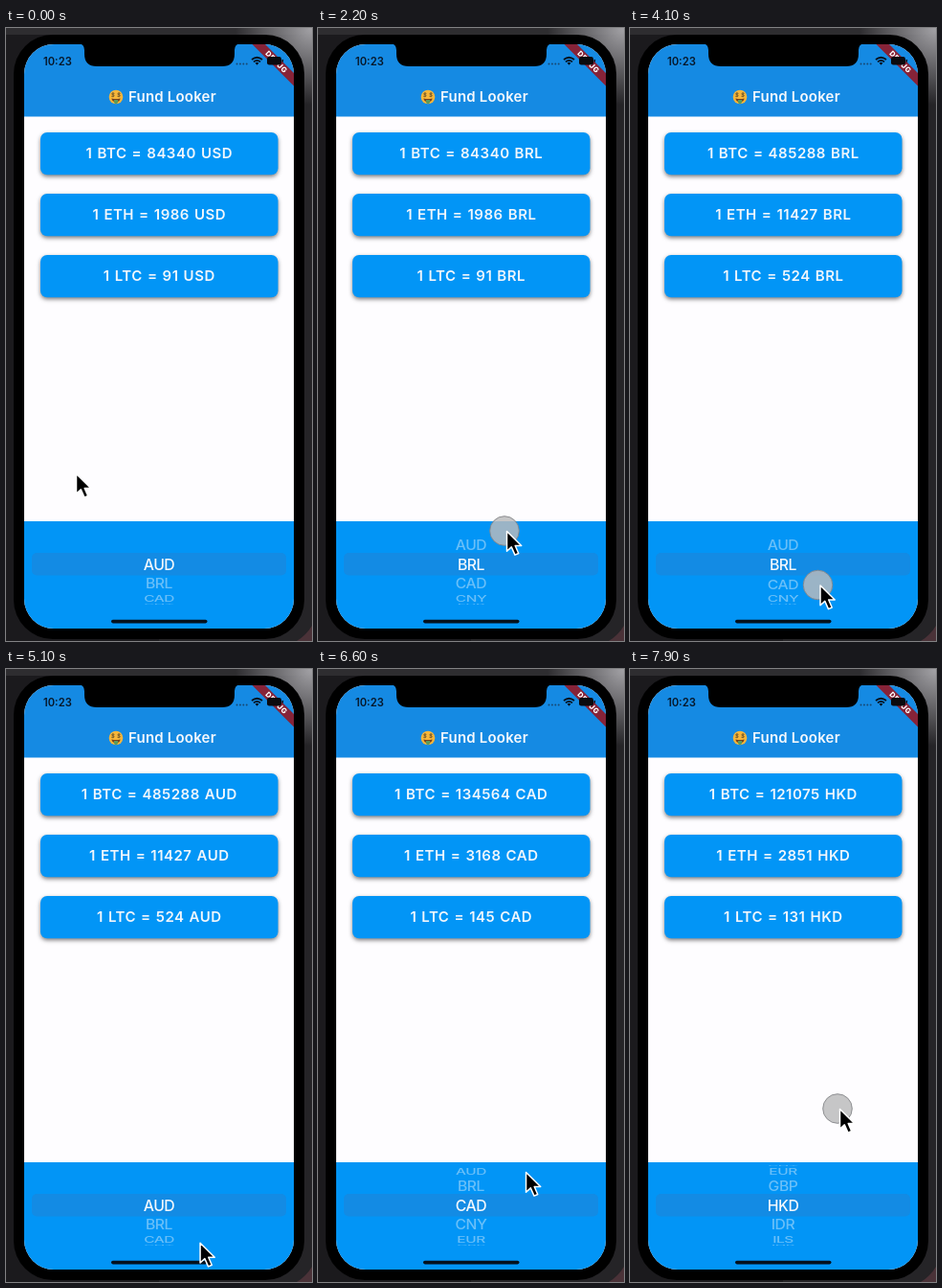
Write an HTML page that moves like this. It is 320 px wide and 640 px high and loops after 8000 ms.

```html
<!DOCTYPE html>
<html lang="en">
<head>
<meta charset="utf-8">
<title>Fund Looker</title>
<style>
  html, body { margin: 0; width: 100%; height: 100%; overflow: hidden; background: #1b1a1d; }
  svg { display: block; width: 100%; height: 100%; }
  text { font-family: Inter, "Liberation Sans", sans-serif; }
  .title { font-size: 15px; font-weight: 600; letter-spacing: .2px; fill: #f5f8fc; }
  .rate { font-size: 15px; font-weight: 600; letter-spacing: .5px; word-spacing: .8px; fill: #f1f6fc; text-anchor: middle; }
  .item { font-size: 15.8px; font-weight: 500; letter-spacing: -.45px; fill: #f4f8fc; text-anchor: middle; }
  .clock { font-size: 11.2px; font-weight: 600; fill: #07182a; }
  .debug { font-size: 7.6px; font-weight: 800; letter-spacing: .5px; fill: #fff; text-anchor: middle; }
  .card { fill: #0295f6; filter: drop-shadow(0 2.4px 2px rgba(0, 0, 0, .5)); }
</style>
</head>
<body>
<svg viewBox="0 0 320 640">
  <defs>
    <radialGradient id="glow" gradientUnits="userSpaceOnUse" cx="320" cy="0" r="80">
      <stop offset="0" stop-color="#a3a2a6"/>
      <stop offset="1" stop-color="#a3a2a6" stop-opacity="0"/>
    </radialGradient>
    <clipPath id="screen"><rect x="19" y="17" width="282" height="610" rx="31"/></clipPath>
  </defs>

  <rect width="320" height="640" fill="#1b1a1d"/>
  <rect x="160" width="160" height="640" fill="#252427"/>
  <rect width="320" height="7" fill="#2e2d30"/>
  <rect x="240" width="80" height="80" fill="url(#glow)"/>
  <path d="M320 624V640H304Q314 634 320 624Z" fill="#4a3238"/>
  <rect x="8" y="7" width="304" height="631" rx="41" fill="#000"/>

  <g clip-path="url(#screen)">
    <rect x="19" y="17" width="282" height="610" fill="#fefdff"/>
    <rect x="19" y="17" width="282" height="75.5" fill="#158ae3"/>
    <rect x="19" y="515" width="282" height="112" fill="#0295f6"/>
    <rect x="27" y="548" width="266" height="23.5" rx="5" fill="#138be4"/>

    <g transform="translate(115 72)">
      <circle r="7.3" fill="#f6b63a"/>
      <path d="M-4.6 1.4Q0 2.8 4.6 1.4Q4 5.2 0 5.2Q-4 5.2 -4.6 1.4Z" fill="#7a431c"/>
      <path d="M-2 3H2V5.4Q1.6 7.2 0 7.2Q-1.6 7.2 -2 5.4Z" fill="#5a9a5c"/>
      <g id="eyes" fill="none" stroke="#80622a"></g>
    </g>
    <text class="title" x="128" y="77.2">Fund Looker</text>

    <g id="cards"></g>
    <g id="wheel"></g>

    <path d="M257.5 17H271L301 47V60.5Z" fill="#862338"/>
    <text class="debug" transform="translate(282.8 35.4) rotate(45)" y="2.7">DEBUG</text>
    <text class="clock" x="39" y="38.6">10:23</text>
    <path d="M241.5 37.5H253" stroke="#174a76" stroke-width="2" stroke-linecap="round" stroke-dasharray="0 3.4"/>
    <g fill="none" stroke="#06101c" stroke-width="1.8">
      <path d="M257 33Q262.5 28.4 268 33M259 35.4Q262.5 32.4 266 35.4"/>
      <path d="M260.6 36.6L262.5 38.8L264.4 36.6Q262.5 35 260.6 36.6Z" fill="#06101c" stroke="none"/>
    </g>
    <rect x="273" y="30" width="15" height="8.6" rx="2.4" fill="#0b0a0e"/>
    <rect x="288.7" y="32.7" width="1.2" height="3.2" rx=".6" fill="#0b0a0e"/>
    <rect x="110" y="617.8" width="100.5" height="3.6" rx="1.8" fill="#04111d"/>
  </g>
  <path d="M76 16Q82 17 82 23V27Q82 40 95 40H226Q239 40 239 27V23Q239 17 245 16Z" fill="#000"/>

  <circle id="touch" r="15.3" fill="rgba(186,186,188,.83)" stroke="#85868a" stroke-width=".9"/>
  <path id="cursor" d="M0 0V20.8L4.8 16.4L8.5 24.6L12.2 23L8.7 15H15.2Z"
        fill="#000" stroke="#fff" stroke-width="1.5" stroke-linejoin="round"/>
</svg>

<script>
const LOOP = 8000, STEP = 100;
const SLOP = 18;        // drag distance before the wheel follows
const HOLD = 100;       // the touch lasts a little after the drag
const currencies = ['AUD', 'BRL', 'CAD', 'CNY', 'EUR', 'GBP', 'HKD', 'IDR', 'ILS', 'INR', 'JPY'];
const usd = { BTC: 84340, ETH: 1985.9, LTC: 91 };

// Exchange factors, each in force from the time its answer arrives
const quotes = [
  { at: 0, factor: 1 },
  { at: 2800, factor: 5.75395 },
  { at: 5400, factor: 1.595494 },
  { at: 7000, factor: 1.435559 }
];
// Each drag moves the pointer and turns the wheel to one currency
const home = { end: 0, to: [74, 466], pick: 'AUD' };
const drags = [
  { start: 1400, end: 2200, from: [191, 566], to: [198, 526], pick: 'BRL' },
  { start: 3800, end: 4400, from: [196, 563], to: [203, 602], pick: 'AUD' },
  { start: 5700, end: 6500, from: [204, 598], to: [218, 524], pick: 'CAD' },
  { start: 7300, end: 7900, from: [219, 570], to: [220, 460], pick: 'HKD' }
];

const byId = id => document.getElementById(id);
const clamp = p => Math.min(1, Math.max(0, p));
const ease = p => p * p * (3 - 2 * p);
const mix = (a, b, p) => a + (b - a) * p;
const mixPoint = (a, b, p) => a.map((v, i) => mix(v, b[i], p));

function add(parent, tag, attrs) {
  const node = document.createElementNS('http://www.w3.org/2000/svg', tag);
  for (const key in attrs) node.setAttribute(key, attrs[key]);
  return parent.appendChild(node);
}

for (const x of [-3.1, 3.1]) {
  add(byId('eyes'), 'path', {
    transform: `translate(${x} -2.4)`,
    d: 'M1.5 -1.2Q-1.5 -2.3 -1.3 -.5Q1.9 .2 1.1 1.5Q.1 2.4 -1.7 1.6M0 -2.6V2.6'
  });
}
const labels = Object.keys(usd).map((coin, i) => {
  const y = 109 + 64 * i;
  add(byId('cards'), 'rect', { class: 'card', x: 36, y, width: 248.5, height: 44.3, rx: 7 });
  return add(byId('cards'), 'text', { class: 'rate', x: 160.3, y: y + 27.3 });
});
const items = currencies.map(name => {
  const node = add(byId('wheel'), 'text', { class: 'item', y: 5.6 });
  node.textContent = name;
  return node;
});

function poseAt(t) {
  const i = Math.max(0, drags.findLastIndex(d => t >= d.start));
  const drag = drags[i], next = drags[i + 1];
  const before = i ? drags[i - 1] : home;
  const p = clamp((t - drag.start) / (drag.end - drag.start));
  const lag = SLOP / Math.abs(drag.to[1] - drag.from[1]);
  const turn = ease(clamp((p - lag) / (1 - lag)));

  let tip = mixPoint(drag.from, drag.to, p);
  if (t < drag.start) tip = mixPoint(home.to, drag.from, ease(t / drag.start));
  else if (t > drag.end && next) {
    tip = mixPoint(drag.to, next.from, ease((t - drag.end) / (next.start - drag.end)));
  }
  return {
    tip,
    down: t >= drag.start && t < drag.end + HOLD,
    wheel: mix(currencies.indexOf(before.pick), currencies.indexOf(drag.pick), turn),
    untouched: i === 0 && turn < .5
  };
}

function drawWheel(pos) {
  const radius = 42, pitch = .506;
  items.forEach((node, i) => {
    const d = i - pos, angle = d * pitch, squash = Math.cos(angle);
    const shown = Math.abs(d) < 3.08 && squash > .01;
    node.style.display = shown ? '' : 'none';
    if (!shown) return;
    const y = 560.2 + radius * Math.sin(angle);
    const fade = clamp((Math.abs(d) - .35) / .3);
    node.setAttribute('transform', `translate(160 ${y}) scale(${.95 + .05 * squash} ${squash})`);
    node.setAttribute('opacity', 1 - .57 * fade);
  });
}

function draw(t) {
  const { tip: [x, y], down, wheel, untouched } = poseAt(t);
  drawWheel(wheel);

  const unit = untouched ? 'USD' : currencies[Math.round(wheel)];
  const { factor } = quotes.findLast(q => t >= q.at);
  Object.entries(usd).forEach(([coin, price], i) => {
    labels[i].textContent = `1 ${coin} = ${Math.round(price * factor)} ${unit}`;
  });

  byId('cursor').setAttribute('transform', `translate(${x - .5} ${y - .5})`);
  byId('touch').setAttribute('transform', `translate(${x - 3} ${y - 1})`);
  byId('touch').style.display = down ? '' : 'none';
}

const begin = performance.now();
function tick() {
  const t = (performance.now() - begin) % LOOP;
  draw(Math.floor(t / STEP) * STEP);
  requestAnimationFrame(tick);
}
tick();
</script>
</body>
</html>
```
